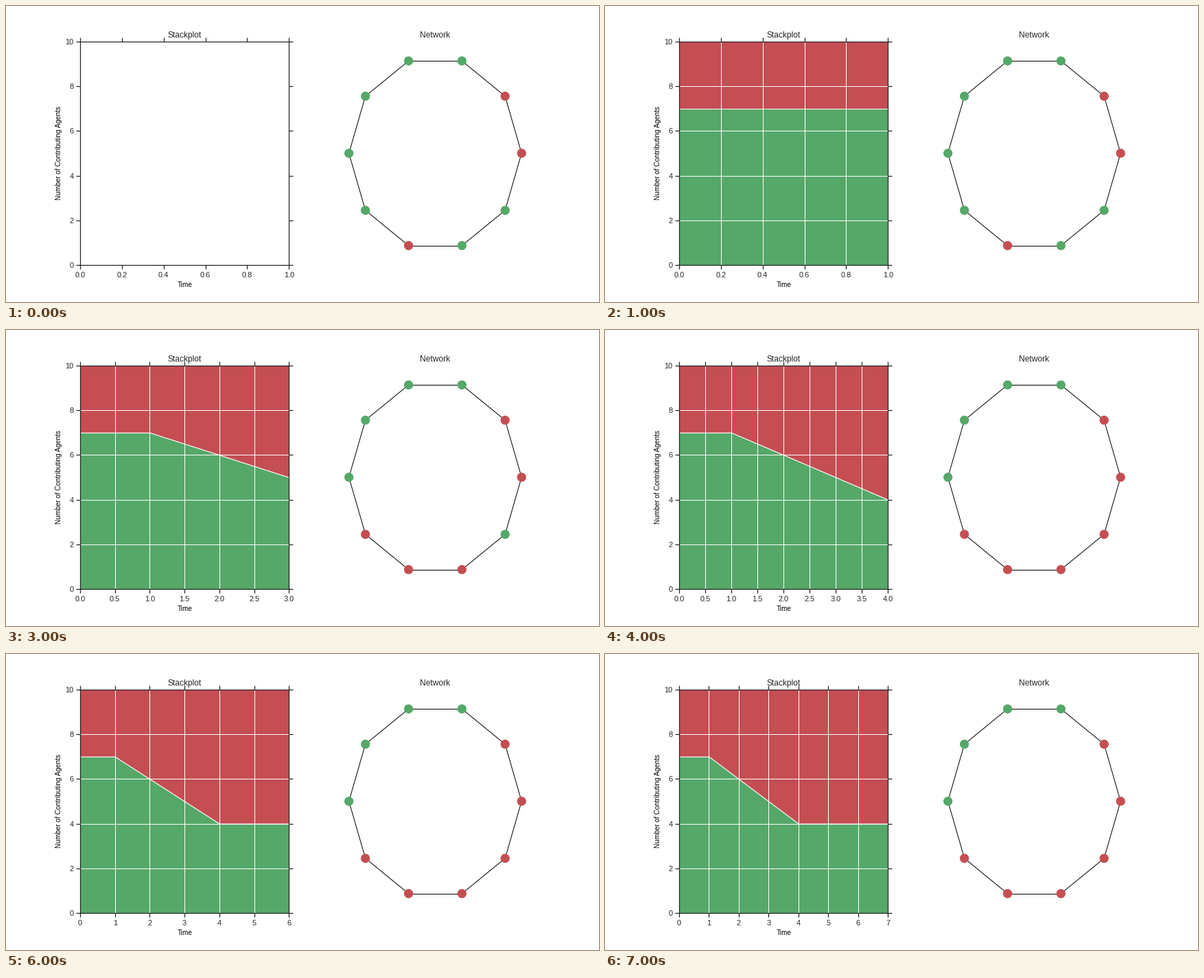
Write a matplotlib script that moves like this. It is 864 px wide and 432 px high and loops after 8 s.

```python
import numpy as np
import matplotlib.pyplot as plt
from matplotlib.animation import FuncAnimation
from matplotlib.collections import LineCollection
from matplotlib.ticker import MaxNLocator, MultipleLocator

GREEN, RED, INK = "#55A868", "#C44E52", "0.15"
STEPS = 8
AGENTS = 10
# step at which each agent stops contributing; agents missing here never do
DEFECTS = {0: 0, 1: 0, 7: 0, 6: 2, 8: 3, 9: 4}

plt.rcParams.update({
    "font.family": "Liberation Sans",
    "text.color": INK,
    "axes.edgecolor": INK,
    "axes.linewidth": 1.25,
    "axes.axisbelow": "line",
})


def has_defected(agent, step):
    return DEFECTS.get(agent, STEPS) <= step


def contributors(step):
    return sum(not has_defected(a, step) for a in range(AGENTS))


fig, (stack_ax, net_ax) = plt.subplots(1, 2, figsize=(12, 6), dpi=72)
fig.subplots_adjust(left=0.125, right=0.9, bottom=0.125, top=0.88, wspace=0.2)

stack_ax.set_title("Stackplot", fontsize=12, y=1, pad=6)
stack_ax.set_xlabel("Time", fontsize=10, color="black", labelpad=4)
stack_ax.set_ylabel("Number of Contributing Agents", fontsize=10,
                    color="black", labelpad=4)
stack_ax.tick_params(top=True, right=True, direction="out", length=6,
                     width=1.25, pad=3.5, labelsize=11,
                     color=INK, labelcolor=INK)
stack_ax.grid(True, color="white", linewidth=1, linestyle="-")
stack_ax.xaxis.set_major_locator(MaxNLocator(9, steps=[1, 2, 2.5, 5, 10]))
stack_ax.yaxis.set_major_locator(MultipleLocator(2))

angles = 2 * np.pi * np.arange(AGENTS) / AGENTS
ring = np.column_stack([np.cos(angles), np.sin(angles)])
edges = np.stack([ring, np.roll(ring, -1, axis=0)], axis=1)

net_ax.set_title("Network", fontsize=12, y=1, pad=6)
net_ax.axis("off")
net_ax.add_collection(LineCollection(edges, colors="black", linewidths=1,
                                     zorder=1))
nodes = net_ax.scatter(ring[:, 0], ring[:, 1], s=150, linewidths=1, zorder=2)
x_max, y_max = 1.21 * ring.max(axis=0)
net_ax.set_xlim(-x_max, x_max)
net_ax.set_ylim(-y_max, y_max)


def update(step):
    for area in list(stack_ax.collections):
        area.remove()
    if step:
        time = np.arange(step + 1)
        giving = np.array([contributors(t) for t in time])
        stack_ax.stackplot(time, giving, AGENTS - giving, colors=[GREEN, RED],
                           edgecolor="white", linewidth=1)
    stack_ax.set_xlim(0, max(step, 1))
    stack_ax.set_ylim(0, AGENTS)

    nodes.set_color([RED if has_defected(a, step) else GREEN
                     for a in range(AGENTS)])
    return []


anim = FuncAnimation(fig, update, frames=STEPS, interval=1000,
                     init_func=lambda: update(0), repeat=True, repeat_delay=0)
plt.show()
```
